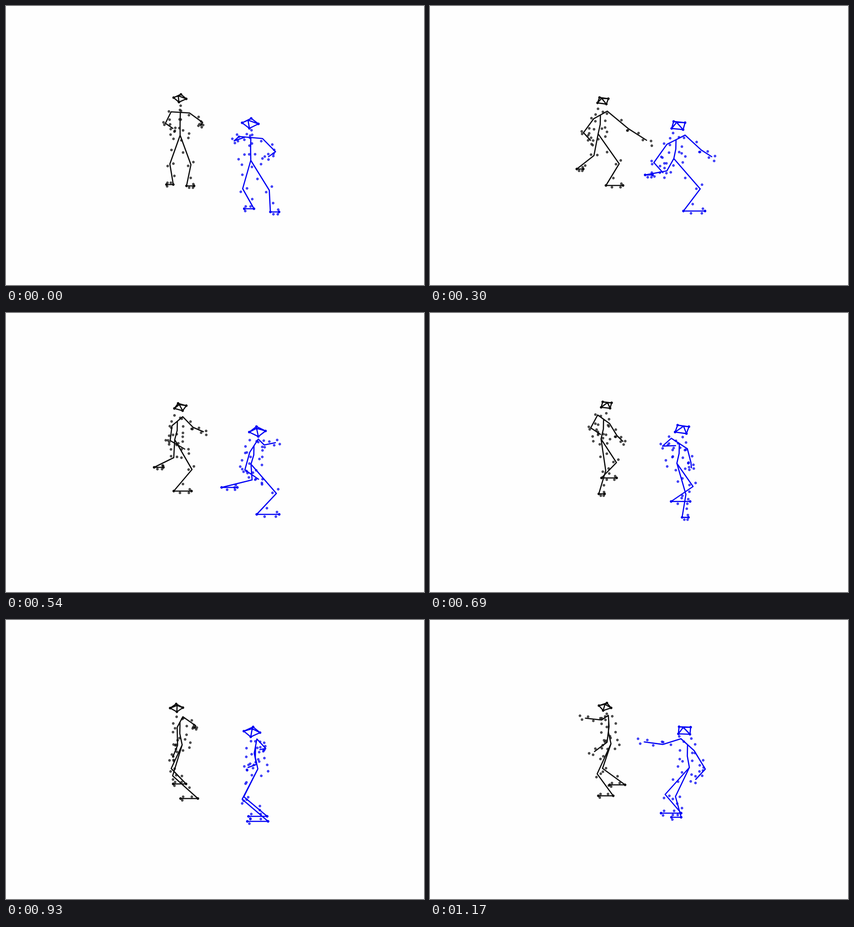
An HTML page that plays this animation: 917x611 px, repeating every 1200 ms.

```html
<!DOCTYPE html>
<html lang="en">
<head>
<meta charset="utf-8">
<title>Two spinning dancers</title>
<style>
html, body { margin: 0; width: 100%; height: 100%; overflow: hidden; background: #fefefe; }
svg { display: block; width: 917px; height: 611px; }
path { fill: none; stroke-width: 2.6; stroke-linejoin: round; stroke-linecap: round; }
.marker { fill-opacity: .7; stroke-opacity: .75; }
</style>
</head>
<body>
<svg id="stage" viewBox="0 0 917 611"></svg>
<script>
const LOOP = 1200, STEP = 30, TILT = .6;
const BEATS = [0, 180, 300, 540, 810, 930, 1170];
const stage = document.getElementById('stage');
const { sin, cos, PI } = Math;

// Only heading, hands and ankles are keyed on the beats; the rest of the body follows
const dancers = [
  {
    color: '#0c0c0c', size: .78, hip: [382, 283], drift: 15, sway: 25, rise: 12,
    heading: [-.1, 1.3, .75, .95, 3.5, 4.4, 4.75],
    rightHand: [[366, 268], [383, 286], [352, 294], [392, 298], [440, 262], [414, 237], [341, 215]],
    leftHand: [[427, 262], [449, 277], [475, 294], [433, 260], [335, 278], [366, 300], [361, 288]],
    rightAnkle: [[367, 391], [326, 386], [322, 357], [325, 338], [415, 379], [395, 359], [428, 361]],
    leftAnkle: [[396, 394], [385, 396], [386, 393], [368, 390], [381, 400], [421, 391], [402, 385]]
  },
  {
    color: '#0000f4', size: 1, hip: [537, 338], drift: 32, sway: 5, rise: 15,
    heading: [-.15, 1.3, .7, 1.2, 3.4, 4.6, 5.3],
    rightHand: [[525, 287], [545, 364], [511, 365], [554, 364], [581, 313], [557, 284], [470, 267]],
    leftHand: [[576, 330], [623, 306], [618, 330], [591, 284], [503, 304], [531, 323], [583, 349]],
    rightAnkle: [[544, 444], [461, 405], [472, 370], [473, 382], [575, 436], [573, 430], [551, 423]],
    leftAnkle: [[580, 451], [562, 462], [556, 449], [550, 441], [559, 452], [575, 441], [551, 432]]
  }
];

const lerp = (a, b, m) => [a[0] + (b[0] - a[0]) * m, a[1] + (b[1] - a[1]) * m];
const move = (p, x, y) => [p[0] + x, p[1] + y];

// Smooth curve through the beats, slopes taken from the neighbours
function curve(keys, t) {
  const last = BEATS.length - 1;
  let i = 0;
  while (i < last - 1 && t >= BEATS[i + 1]) i++;
  const span = BEATS[i + 1] - BEATS[i];
  const u = (t - BEATS[i]) / span, v = 1 - u;
  const slope = k => {
    const a = Math.max(k - 1, 0), b = Math.min(k + 1, last);
    return (keys[b] - keys[a]) / (BEATS[b] - BEATS[a]) * span;
  };
  return keys[i] * v * v * (1 + 2 * u) + keys[i + 1] * u * u * (3 - 2 * u)
    + slope(i) * u * v * v - slope(i + 1) * u * u * v;
}
const pointOn = (keys, t) => [0, 1].map(n => curve(keys.map(k => k[n]), t));

function bodyAt(d, t) {
  const s = d.size, u = t / BEATS[6], turn = curve(d.heading, t);
  const fwd = sin(turn), out = cos(turn);
  // Point offset by the body's own left, front and up
  const local = (p, left, front, up = 0) => move(p,
    s * (left * out + front * fwd),
    s * TILT * (front * out - left * fwd) - up);

  const hip = move(d.hip,
    d.drift * u ** 3 - d.sway * sin(PI * u) * (1 - u), -d.rise * u);
  const bow = Math.max(0, sin(PI * t / 900));
  const neck = move(hip, 1 + 6 * fwd, 10 * bow - 50);
  const chest = move(lerp(hip, neck, .5), 3 * fwd, 0);

  const arm = (hand, side) => {
    const shoulder = local(neck, 26 * side, 0), end = pointOn(hand, t);
    const elbow = move(lerp(shoulder, end, .5), s * (20 * side * out - 14 * fwd), 9 * s);
    return [shoulder, elbow, end];
  };
  const leg = (ankle, side) => {
    const end = pointOn(ankle, t);
    const facing = s * 43 * (fwd + (side > 0 ? .6 : -.35) * out);
    return [hip, move(lerp(hip, end, .5), facing, 9), end, move(end, facing, 0)];
  };

  const mid = move(neck, 8 * fwd, -31);
  const corners = [0, 1, 2, 3].map(i => {
    const a = turn + 3.4 + i * PI / 2;
    return move(mid, 18 * s * cos(a), 11 * s * sin(a));
  });
  return {
    local, hip, chest, neck, corners,
    crown: move(mid, -5 * s * out, -7 * s),
    arms: [arm(d.rightHand, -1), arm(d.leftHand, 1)],
    legs: [leg(d.rightAnkle, -1), leg(d.leftAnkle, 1)]
  };
}

// Markers sit on alternate sides of each limb and around the trunk
function markersOf(b, s) {
  const dots = [];
  const along = (from, to, shares, gap) => {
    const dx = to[0] - from[0], dy = to[1] - from[1], len = Math.hypot(dx, dy) || 1;
    shares.forEach((m, i) => {
      const off = s * gap * (i % 2 ? -1 : 1) / len;
      dots.push(move(lerp(from, to, m), -dy * off, dx * off));
    });
  };
  for (const [shoulder, elbow, hand] of b.arms) {
    along(shoulder, elbow, [.05, .6, 1], 6);
    along(elbow, hand, [0, .5, .85, 1.2, 1.35], 5);
  }
  for (const [hip, knee, ankle, toe] of b.legs) {
    along(hip, knee, [.55, .95], 9);
    along(knee, ankle, [.08, .6], 7);
    along(ankle, toe, [.35, .9, .85], 5);
  }
  for (let i = 0; i < 7; i++) {
    const a = (i + .5) * 2 * PI / 7;
    dots.push(b.local(b.hip, 27 * cos(a), 24 * sin(a)));
  }
  for (const front of [-20, 20]) {
    dots.push(b.local(b.neck, 0, front / 2, 10), b.local(b.neck, 0, front, -6),
      b.local(b.chest, 0, front));
  }
  return dots;
}

function add(parent, tag, attrs) {
  const el = document.createElementNS('http://www.w3.org/2000/svg', tag);
  for (const name in attrs) el.setAttribute(name, attrs[name]);
  return parent.appendChild(el);
}

const path = pts => 'M' + pts.map(p => p.map(n => n.toFixed(2)).join(' ')).join('L');

function showDots(group, pts, attrs) {
  pts.forEach(([x, y], i) => {
    const dot = group.children[i] || add(group, 'circle', attrs);
    dot.setAttribute('cx', x.toFixed(2));
    dot.setAttribute('cy', y.toFixed(2));
  });
}

function draw(d, t) {
  const b = bodyAt(d, t), [p, q, r, w] = b.corners;
  const [right, left] = b.arms;
  const lines = [[b.hip, b.chest, b.neck], [...right].reverse().concat([b.neck], left),
    ...b.legs, [p, q, r, w, p], [p, b.crown, q], [r, b.crown, w]];
  d.bones.setAttribute('d', lines.map(path).join(''));
  showDots(d.markers, markersOf(b, d.size), { class: 'marker', r: 2.4 });
  showDots(d.ends, [...b.corners, ...b.legs.flatMap(l => l.slice(2))], { r: 2.4 });
}

for (const d of dancers) {
  const g = add(stage, 'g', { fill: d.color, stroke: d.color });
  d.markers = add(g, 'g');
  d.bones = add(g, 'path');
  d.ends = add(g, 'g');
}

const start = performance.now();
function tick() {
  const t = Math.max(0, performance.now() - start) % LOOP;
  dancers.forEach(d => draw(d, Math.floor(t / STEP) * STEP));
  requestAnimationFrame(tick);
}
tick();
</script>
</body>
</html>
```
